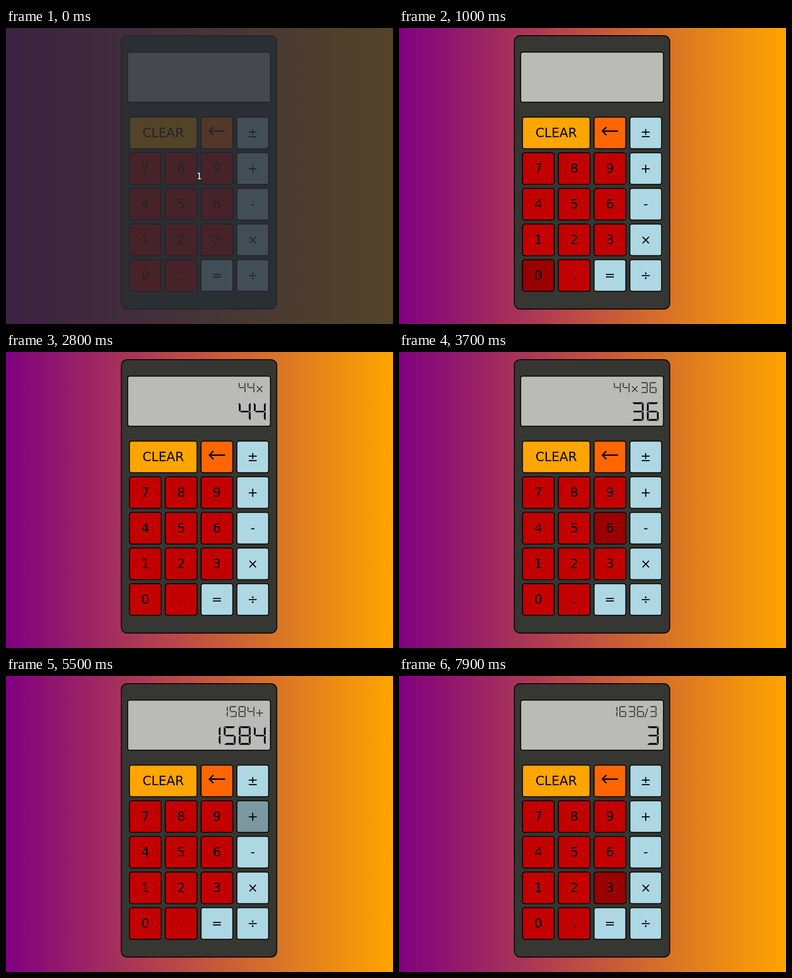
Write an HTML page with a canvas that moves like this. It is 854 by 656 pixels and loops after 8 s.

```html
<!DOCTYPE html>
<html lang="en">
<head>
<meta charset="utf-8">
<title>Calculator</title>
<style>
  html, body { margin: 0; width: 100%; height: 100%; overflow: hidden; }
  canvas { display: block; }
</style>
</head>
<body>
<canvas id="stage" width="854" height="656"></canvas>
<script>
const ctx = document.getElementById('stage').getContext('2d');
const LOOP = 8000;
const FONT = '"DejaVu Sans", sans-serif';
const RED = ['#c30000', '#9b0000'], BLUE = ['#add8e3', '#7a99a1'];
const ROWS = ['C ←±', '789+', '456-', '123×', '0.=÷'];
const PITCH = 79, LEFT = 272.5, TOP = 197.5, SIZE = 70;

// [time, key under the pointer]
const HOVER = [
  [0, ''], [700, '8'], [800, '5'], [900, '1'], [1000, '0'], [1200, ''], [1300, '1'], [1400, '4'],
  [2000, ''], [2100, '6'], [2200, '-'], [2500, '×'], [2800, ''], [2900, '3'], [3200, '6'],
  [3800, '3'], [3900, '='], [4500, '3'], [4600, '6'], [4700, '-'], [5000, ''], [5100, '+'],
  [5600, ''], [5800, '2'], [6000, '5'], [6300, '2'], [6700, '='], [7200, ''], [7300, '÷'], [7700, '3']
];
// [time, expression, value]
const SCREEN = [
  [0, '', ''], [1800, '4', '4'], [1900, '44', '44'], [2700, '44×', '44'], [3100, '44×3', '3'],
  [3700, '44×36', '36'], [4200, '44×36=', '1584'], [5500, '1584+', '1584'], [6200, '1584+5', '5'],
  [6600, '1584+52', '52'], [6900, '1584+52=', '1636'], [7500, '1636/', '1636'], [7900, '1636/3', '3']
];

// Seven-segment digits in a 26 x 41 cell
const SEGMENTS = {
  a: [1, 0, 25, 0, 21, 4, 5, 4],
  b: [26, 1, 26, 19, 24, 20, 22, 17, 22, 5],
  c: [26, 40, 26, 22, 24, 21, 22, 24, 22, 36],
  d: [1, 41, 25, 41, 21, 37, 5, 37],
  e: [0, 40, 0, 22, 2, 21, 4, 24, 4, 36],
  f: [0, 1, 0, 19, 2, 20, 4, 17, 4, 5],
  g: [2.5, 20.5, 5, 18.7, 21, 18.7, 23.5, 20.5, 21, 22.3, 5, 22.3]
};
const DIGITS = ['abcdef', 'bc', 'abged', 'abgcd', 'fgbc', 'afgcd', 'afgecd', 'abc', 'abcdefg', 'abcdfg'];

const current = (list, t) => list.findLast(item => item[0] <= t);

function box(x, y, w, h, r, fill) {
  ctx.beginPath();
  ctx.roundRect(x, y, w, h, r);
  ctx.fillStyle = fill;
  ctx.fill();
  ctx.strokeStyle = '#000';
  ctx.lineWidth = 2;
  ctx.stroke();
}

function label(text, x, y, size, color, align = 'center') {
  ctx.font = `${size}px ${FONT}`;
  ctx.textAlign = align;
  ctx.fillStyle = color;
  ctx.fillText(text, x, y);
}

function digit(d, x, y, scale, color) {
  ctx.fillStyle = color;
  ctx.beginPath();
  for (const name of DIGITS[d]) {
    const p = SEGMENTS[name];
    for (let i = 0; i < p.length; i += 2) {
      ctx[i ? 'lineTo' : 'moveTo'](x + p[i] * scale, y + p[i + 1] * scale);
    }
    ctx.closePath();
  }
  ctx.fill();
}

// Right-aligned line of digits and operators
function readout(text, right, bottom, scale, color) {
  let x = right;
  for (const c of [...text].reverse()) {
    if (c >= '0' && c <= '9') {
      digit(c, x - 28 * scale, bottom - 41 * scale, scale, color);
      x -= 33.2 * scale;
    } else {
      label(c, x, bottom - 1, 24, color, 'right');
      x -= ctx.measureText(c).width;
    }
  }
}

function arrow(x, y) {
  ctx.beginPath();
  ctx.moveTo(x + 18, y);
  ctx.lineTo(x - 16, y);
  ctx.moveTo(x - 8, y - 9);
  ctx.lineTo(x - 16.5, y);
  ctx.lineTo(x - 8, y + 9);
  ctx.lineWidth = 3.2;
  ctx.stroke();
}

function key(name, col, row, hovered, selected) {
  const x = LEFT + col * PITCH, y = TOP + row * PITCH;
  const wide = name === 'C';
  const w = wide ? SIZE + PITCH : SIZE;
  const cx = x + w / 2, baseline = y + 44.5;
  const tone = hovered ? 1 : 0;
  const fill = wide ? '#ffa500' : name === '←' ? '#ff6600' : /[\d.]/.test(name) ? RED[tone] : BLUE[tone];
  box(x, y, w, SIZE, 5, fill);
  if (name === '←') return arrow(cx, y + 31);
  if (selected) {
    ctx.fillStyle = '#15855e';
    ctx.fillRect(cx - 8.9, baseline - 26, 17.8, 33);
  }
  label(wide ? 'CLEAR' : name, cx, baseline, 28, selected ? '#fff' : '#000');
}

function draw(t) {
  const sky = ctx.createLinearGradient(0, 0, 854, 0);
  sky.addColorStop(0, 'purple');
  sky.addColorStop(1, 'orange');
  ctx.fillStyle = sky;
  ctx.fillRect(0, 0, 854, 656);

  box(254.5, 17, 343, 606, 13, '#363632');
  box(268.5, 53.5, 315, 111, 5, '#babab7');

  const hover = current(HOVER, t)[1];
  const selecting = t >= 1900 && t < 2600;
  ROWS.forEach((row, r) => [...row].forEach((name, c) => {
    if (name !== ' ') key(name, c, r, name === hover, name === '4' && selecting);
  }));

  const [, expression, value] = current(SCREEN, t);
  readout(expression, 569.5, 91, 0.59, '#3c3c3a');
  readout(value, 575, 152.5, 1, '#000');

  if (t < 100) {
    ctx.fillStyle = 'rgba(40, 44, 52, 0.8)';
    ctx.fillRect(0, 0, 854, 656);
    label('1', 426.5, 335, 19, '#fff');
  }
}

function tick() {
  draw(performance.now() % LOOP);
  requestAnimationFrame(tick);
}
tick();
</script>
</body>
</html>
```
